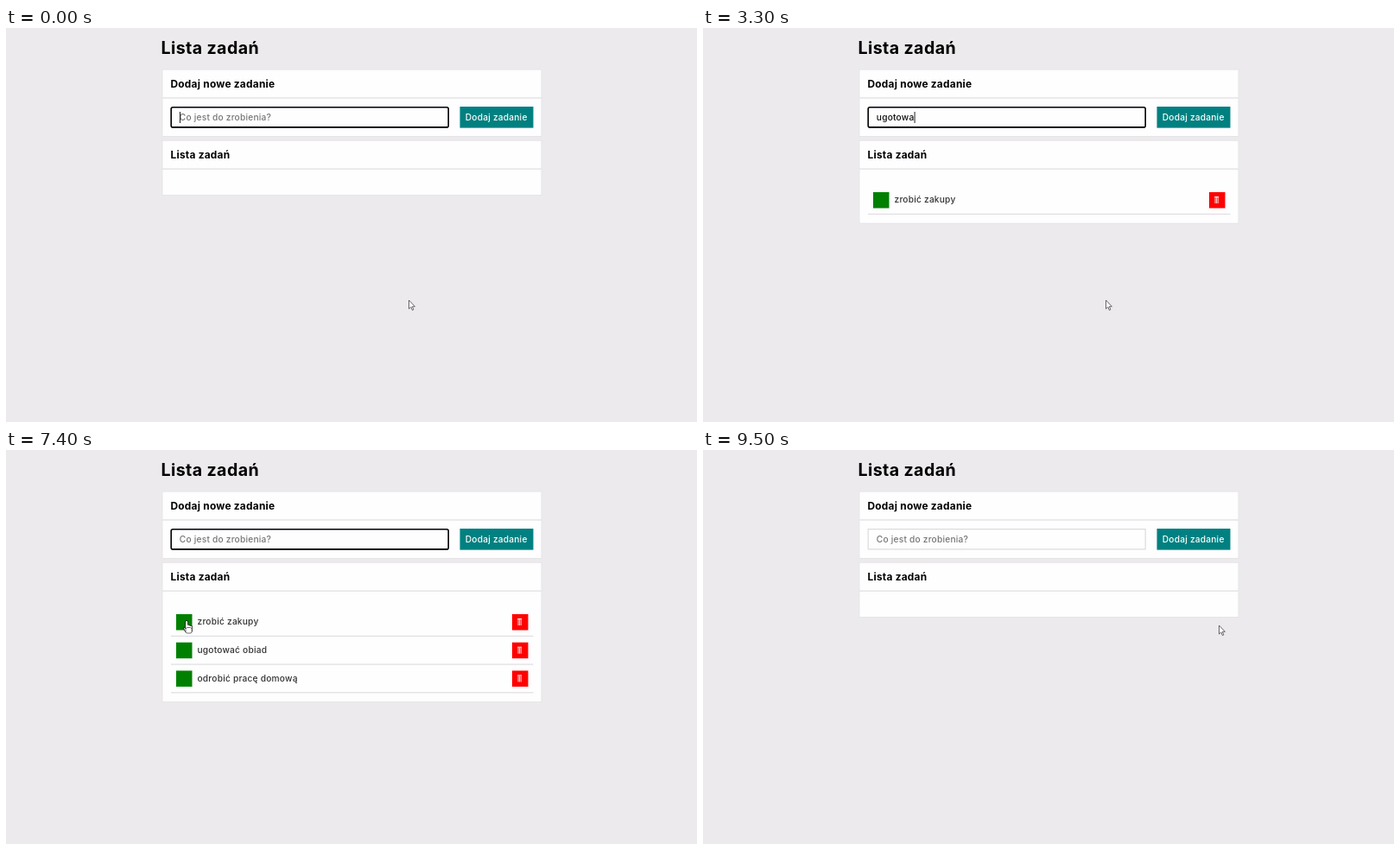
An HTML page with a canvas for the animation above (9.6 s loop, 800 by 456 pixels).

```html
<!DOCTYPE html>
<html lang="pl">
<head>
<meta charset="utf-8">
<title>Lista zadań</title>
<style>
  html, body { margin: 0; width: 100%; height: 100%; overflow: hidden; background: #eceaec; }
  canvas { display: block; width: 800px; height: 456px; }
</style>
</head>
<body>
<canvas id="stage" width="800" height="456"></canvas>
<script>
const ctx = document.getElementById("stage").getContext("2d");
const LOOP = 9600, STEP = 100, CARET_ON = 500;
const FIRST_ROW = 190, ROW = 32.7, BOX = 18.5, CHECK_X = 197, BIN_X = 586;
const BODY = "450 10.2px Inter, sans-serif";
const BUTTON = "550 10.2px Inter, sans-serif";
const HEADING = "650 11.9px Inter, sans-serif";
const TITLE = "700 19.6px Inter, sans-serif";
const PAGE = "#eceaec", PANEL = "#fefdff", LINE = "#e6e4e7";

// Typing runs from start to end and rests for one step at pause.
const tasks = [
  { text: "zrobić zakupy", start: 300, pause: 700, end: 1500, added: 2200 },
  { text: "ugotować obiad", start: 2800, pause: 3400, end: 3900, added: 4000 },
  { text: "odrobić pracę domową", start: 4700, pause: 4800, end: 6500, added: 6600 }
];
tasks.forEach((task, i) => {
  task.done = 7500 + 400 * i;
  task.removed = 8800 + 350 * i;
});
const blurAt = tasks[0].done;

function rect(x, y, w, h, color) {
  ctx.fillStyle = color;
  ctx.fillRect(x, y, w, h);
}

function outline(color, width) {
  ctx.strokeStyle = color;
  ctx.lineWidth = width;
  ctx.stroke();
}

function write(text, x, y, font, color) {
  ctx.font = font;
  ctx.letterSpacing = "0.02em";
  ctx.fillStyle = color;
  ctx.fillText(text, x, y);
  return ctx.measureText(text).width;
}

// Eased share of a move between two times.
function ease(t, from, to) {
  const p = Math.min(1, Math.max(0, (t - from) / (to - from)));
  return p * p * (3 - 2 * p);
}

function panel(top, bottom, heading) {
  rect(180.5, top, 440, bottom - top, LINE);
  rect(181.5, top + 1, 438, bottom - top - 2, PANEL);
  rect(181, top + 32.6, 439, 1.5, LINE);
  write(heading, 190.5, top + 21, HEADING, "#000");
}

function typedText(t) {
  const task = tasks.find(({ start, added }) => t >= start && t < added);
  if (!task) return "";
  const { text, start, pause, end } = task;
  const rested = t >= pause ? STEP : 0;
  const share = Math.min(1, (t - start + STEP - rested) / (end - start));
  return text.slice(0, Math.floor(text.length * share + 1e-6));
}

function caretVisible(t) {
  return t < CARET_ON || tasks.some(({ start, end, added }) =>
    (t >= start && t <= end) || (t >= added && t < added + CARET_ON));
}

function drawInput(t) {
  const focused = t < blurAt;
  ctx.beginPath();
  ctx.roundRect(191.2, 91.7, 321, 23.2, focused ? 2 : 0);
  outline(focused ? "#000" : "#dddbde", focused ? 1.6 : 1.2);

  const text = typedText(t);
  const width = write(text || "Co jest do zrobienia?", 200.8, 107, BODY, text ? "#111" : "#757575");
  if (focused && caretVisible(t)) rect(201 + (text ? width : 0), 97, 1, 13, "#222");
}

function drawBin(y) {
  rect(BIN_X, y, BOX, BOX, "#f00");
  rect(592.2, y + 5, 5, 1, "#fff");
  for (let i = 0; i < 3; i++) rect(592.5 + 1.6 * i, y + 6, 1, 7, "#fbd5d5");
}

function drawCheck(y) {
  ctx.beginPath();
  ctx.moveTo(202.7, y + 9.8);
  ctx.lineTo(204.8, y + 12.6);
  ctx.lineTo(209.3, y + 5.3);
  outline("#fff", 1.3);
}

function drawTask(task, index, t) {
  const y = FIRST_ROW + index * ROW;
  rect(CHECK_X, y, BOX, BOX, "#008000");
  const width = write(task.text, 221.5, y + 12.3, BODY, "#333");
  if (t >= task.done) {
    rect(221.5, y + 8.5, width, 1, "#222");
    drawCheck(y);
  }
  drawBin(y);
  rect(191, y + 24.8, 419.5, 1.2, "#e0dee1");
}

function drawArrow() {
  ctx.beginPath();
  ctx.moveTo(0, 0);
  ctx.lineTo(0, 10);
  ctx.lineTo(2.3, 7.9);
  ctx.lineTo(3.9, 11.6);
  ctx.lineTo(5.4, 10.9);
  ctx.lineTo(3.8, 7.3);
  ctx.lineTo(6.9, 7.3);
  ctx.closePath();
  ctx.fillStyle = "#fff";
  ctx.fill();
  outline("#444", 0.8);
}

function drawHand() {
  ctx.beginPath();
  ctx.roundRect(-1, 0, 2.2, 10, 1);
  for (let i = 0; i < 3; i++) ctx.roundRect(1 + 1.7 * i, 4.6 + 0.6 * i, 1.9, 6, 0.9);
  ctx.moveTo(-1, 9);
  ctx.lineTo(-3.4, 7.6);
  ctx.lineTo(-1, 12.5);
  outline("#111", 1.4);
  ctx.fillStyle = "#fff";
  ctx.fill();
  ctx.beginPath();
  ctx.roundRect(-1, 7.5, 7.2, 6.5, 2);
  ctx.fill();
  outline("#111", 0.6);
}

function pointerAt(t) {
  const reach = ease(t, 7000, 7400), down = ease(t, 7500, 8200), across = ease(t, 8300, 8700);
  return [
    466.5 - 257.5 * reach + 2.5 * down + 386 * across,
    315 - 117 * reach + 65 * down - 60 * across
  ];
}

function drawPointer(t, count) {
  const [x, y] = pointerAt(t);
  const row = (y - FIRST_ROW) / ROW;
  const inRow = row >= 0 && row < count && (row % 1) * ROW < BOX;
  const inButton = [CHECK_X, BIN_X].some(left => x > left && x < left + BOX);
  ctx.save();
  ctx.translate(x, y);
  ctx.lineJoin = "round";
  if (inRow && inButton) drawHand();
  else drawArrow();
  ctx.restore();
}

function draw(t) {
  const visible = tasks.filter(task => t >= task.added && t < task.removed);
  rect(0, 0, 800, 456, PAGE);
  write("Lista zadań", 179.5, 30, TITLE, "#000");
  panel(47.6, 126, "Dodaj nowe zadanie");
  panel(129.8, 194 + visible.length * ROW, "Lista zadań");
  drawInput(t);
  rect(525.5, 91, 85, 24.6, "#008080");
  write("Dodaj zadanie", 531.8, 106.8, BUTTON, "#fff");
  visible.forEach((task, i) => drawTask(task, i, t));
  drawPointer(t, visible.length);
}

const began = performance.now();
function tick() {
  const t = (performance.now() - began) % LOOP;
  draw(Math.floor(t / STEP) * STEP);
  requestAnimationFrame(tick);
}
tick();
</script>
</body>
</html>
```
